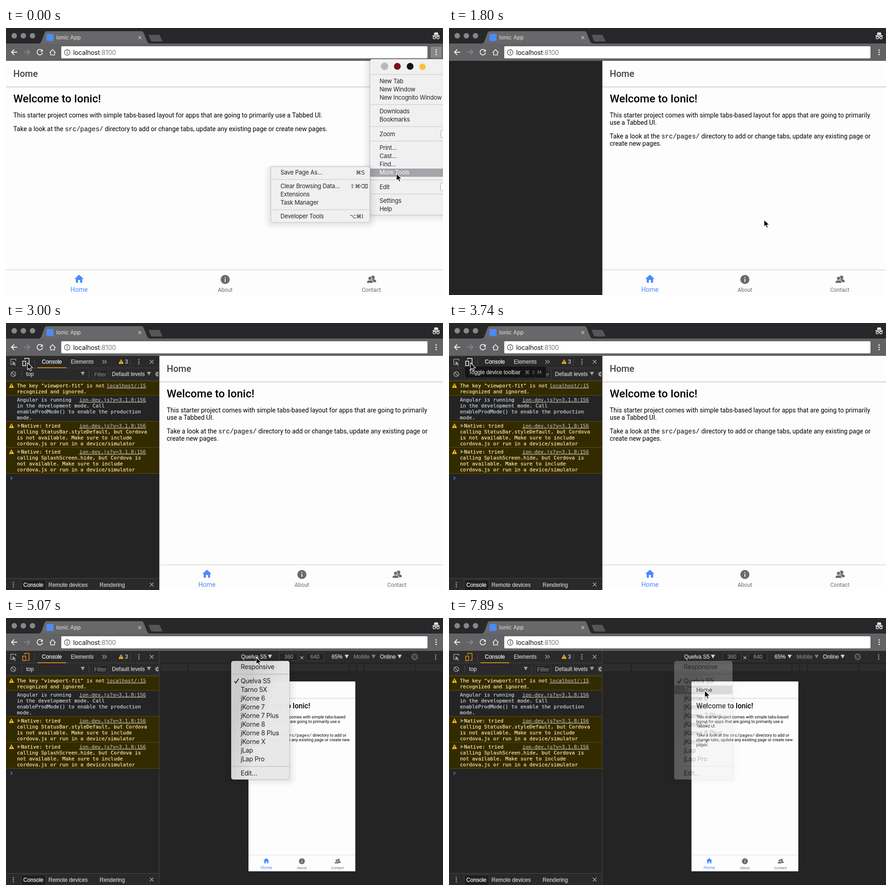
An HTML page for the animation above (8000 ms loop, 957x585 px).

```html
<!DOCTYPE html>
<html lang="en">
<head>
<meta charset="utf-8">
<title>Device preview</title>
<style>
html, body { margin: 0; width: 100%; height: 100%; overflow: hidden; background: #fdfdfd; }
svg { display: block; }
text { white-space: pre; }
.mac { font: 13px Inter, sans-serif; letter-spacing: -.3px; fill: #262626; }
.drop { font: 14px Inter, sans-serif; letter-spacing: -.25px; fill: #1c1c1c; }
.key { font: 12px "DejaVu Sans", sans-serif; fill: #262626; }
.page { font: 14px Roboto, sans-serif; fill: #000; }
.code { font-family: "Liberation Mono", monospace; }
.dev, .log { color: #cdcdcd; fill: currentColor; stroke: currentColor; stroke-width: .25px; }
.dev { font: 12px "Liberation Sans", sans-serif; }
.log { font: 11px "DejaVu Sans Mono", monospace; }
.mid { text-anchor: middle; }
.end { text-anchor: end; }
</style>
</head>
<body>
<svg id="stage" width="957" height="585" viewBox="0 0 957 585"></svg>
<script>
const rect = (x, y, w, h, fill, more = '') =>
  `<rect x="${x}" y="${y}" width="${w}" height="${h}" fill="${fill}" ${more}/>`;
const dot = (x, y, r, fill, more = '') =>
  `<circle cx="${x}" cy="${y}" r="${r}" fill="${fill}" ${more}/>`;
const path = (d, fill, more = '') => `<path d="${d}" fill="${fill}" ${more}/>`;
const line = (d, color, w = 1, more = '') =>
  path(d, 'none', `stroke="${color}" stroke-width="${w}" ${more}`);
const text = (x, y, s, cls, more = '') =>
  `<text x="${x}" y="${y}" class="${cls}" ${more}>${s}</text>`;
const group = (id, body, more = '') => `<g id="${id}" ${more}>${body}</g>`;
const tint = c => `style="color:${c}"`;
const dots = (x, y, gap, r, c) => [-1, 0, 1].map(k => dot(x, y + k * gap, r, c)).join('');
const cross = (x, y, r, c, w) =>
  line(`M${x - r} ${y - r}l${2 * r} ${2 * r}m0 ${-2 * r}l${-2 * r} ${2 * r}`, c, w);
const down = (x, y, c) => path(`M${x - 4.5} ${y - 4}h9l-4.5 8z`, c);
const vline = (x, y, h, c = '#4a4a4a') => rect(x, y, 1, h, c);

// Browser window

function chrome() {
  const ink = '#f1f1f1';
  return rect(0, 0, 957, 34, '#28282a') + rect(0, 34, 957, 38, '#636365') +
    [18, 38, 58].map(x => dot(x, 17, 6, '#878787')).join('') +
    path('M72 34C76 33 77 31 78.500 27L84 12C85.500 8 87 7 90 7H296C299 7 300.500 8 302 12L308 27C310 32 311 33 315 34Z', '#68686a') +
    path('M312 15H334Q336 15 337 17L342 27Q343 29.500 341 29.500H320Q318 29.500 317 27Z', '#565658') +
    rect(88.5, 13, 15.5, 15.5, '#4b8bf5', 'rx="2"') +
    text(110, 25, 'Ionic App', 'mac', 'style="font-size:12px;letter-spacing:0;fill:#e6e6e6"') +
    cross(293, 21, 3.2, '#c4c4c4', 1.3) +
    line('M24.500 53H12.500M18 47L12 53L18 59', ink, 1.8) +
    line('M39.500 53H51.500M46 47L52 53L46 59', '#858587', 1.8) +
    line('M79 49.500A6 6 0 1 0 80 54', ink, 1.8) + path('M80.500 46.500V52H75Z', ink) +
    line('M95.500 54L102 47.500L108.500 54M97.700 53V59H106.300V53', ink, 1.6) +
    rect(121, 40, 802, 26.5, '#fff', 'rx="2"') +
    dot(134, 53.5, 6, 'none', 'stroke="#555" stroke-width="1.3"') +
    rect(133.3, 52.3, 1.5, 4.5, '#555') + rect(133.3, 49.8, 1.5, 1.5, '#555') +
    text(147, 58.5, 'localhost<tspan fill="#777">:8100</tspan>', 'mac',
      'style="font-size:14px;letter-spacing:-.15px;fill:#111"') +
    path('M937 15L938.500 10Q939 9.200 940 9.500L942 10L944 9.500Q945 9.200 945.500 10L947 15Z', ink) +
    rect(934, 16, 16, 1.6, ink) +
    [938, 946].map(x => dot(x, 21, 2.7, 'none', `stroke="${ink}" stroke-width="1.4"`)).join('') +
    line('M940.500 20.500Q942 19.500 943.500 20.500', ink, 1.2) +
    group('menuButton', rect(930, 41, 24, 25, '#88888a', 'rx="2"')) +
    dots(942, 53, 5, 1.6, ink);
}

// Web page, laid out for a given viewport

function page(id, w, h, para1, para2, place) {
  const lines = (y, rows) => rows.map((s, k) => text(16, y + 16 * k, s, 'page')).join('');
  const top = h - 56, gray = '#6b6b6b';
  const c = [1, 3, 5].map(k => w * k / 6);
  const label = (k, s, size, color) =>
    text(c[k], top + 49, s, 'page mid', `style="font-size:${size}px;fill:${color}"`);
  const person = (x, y, more) =>
    dot(x, y - 3.5, 4, gray, more) + path(`M${x - 7} ${y + 7}v-2.500q0-4 7-4t7 4v2.500z`, gray, more);
  return group(id,
    rect(0, 0, w, h, '#fdfdfd') +
    rect(0, 56, w, 1.6, '#cdcdcd') + rect(0, 57.6, w, 1.4, '#ececec') +
    text(16, 35, 'Home', 'page', 'style="font-size:20px;font-weight:500;fill:#424242"') +
    text(16, 91, 'Welcome to Ionic!', 'page', 'style="font-size:24px;font-weight:500"') +
    lines(124, para1) + lines(124 + 16 * para1.length + 14, para2) +
    rect(0, top, w, 1.6, '#dcdcdc') +
    path(`M${c[0]} ${top + 11.500}l-10 9.200h3v8.300h4.800v-6h4.400v6h4.800v-8.300h3z`, '#488aff') +
    label(0, 'Home', 14, '#488aff') +
    dot(c[1], top + 22, 10, gray) + rect(c[1] - 1, top + 21, 2, 6, '#fdfdfd') +
    rect(c[1] - 1, top + 17, 2, 2, '#fdfdfd') + label(1, 'About', 12, gray) +
    person(c[2] + 3.5, top + 21, '') +
    person(c[2] - 3, top + 23, 'stroke="#fdfdfd" stroke-width="1.2"') +
    label(2, 'Contact', 12, gray), `transform="${place}"`);
}
const src = '<tspan class="code">src/pages/</tspan>';
const intro = 'This starter project comes with simple tabs-based';

// Menus

function panel(x, y, w, h, color) {
  const halo = [14, 9, 5, 2].map(k =>
    rect(x - k, y - k / 3, w + 2 * k, h + k * 4 / 3, '#000', `rx="${k + 3}" opacity=".022"`)).join('');
  return halo + rect(x, y, w, h, color, 'rx="5" stroke="#000" stroke-opacity=".18"');
}
const rule = (x, y, w, c = '#d3d3d3') => rect(x, y, w, 1.5, c);

const subRows = [['Save Page As…', 308, '⌘S', 766], ['Clear Browsing Data…', 338, '⇧⌘⌫', 754],
  ['Extensions', 356], ['Task Manager', 374], ['Developer Tools', 404, '⌥⌘I', 753]];

function mainMenu() {
  const rows = [['New Tab', 121], ['New Window', 139], ['New Incognito Window', 157],
    ['Downloads', 187], ['Bookmarks', 205], ['Zoom', 237], ['Print…', 267], ['Cast…', 285],
    ['Find…', 303], ['Edit', 353], ['Settings', 383], ['Help', 401]];
  const box = 'rx="2" stroke="#a5a5a5"';
  return panel(797, 68, 180, 342, '#f0f0f0') +
    dot(829, 84, 8, '#b9b9b9') + dot(857, 84, 7.5, '#800f17') +
    dot(885, 84, 7.5, '#111') + dot(912, 85, 7, '#f6c22f') +
    [101, 167, 215, 247, 332, 363].map(y => rule(797.5, y, 160)).join('') +
    rect(952.5, 223.5, 20, 17, '#fbfbfb', box) + rect(951.5, 339.5, 20, 17, '#fbfbfb', box) +
    rows.map(([s, y]) => text(818, y, s, 'mac')).join('') +
    rect(797.5, 308, 160, 18, '#a5a4a9') + text(818, 321, 'More Tools', 'mac', 'style="fill:#fff"') +
    panel(580, 304, 217, 122, '#f0f0f0') + rule(580.5, 331, 216) + rule(580.5, 397.5, 216) +
    group('subMark', rect(580.5, 0, 216, 18, '#a5a4a9')) +
    subRows.map(([s, y, key, x], k) => group('sub' + k, text(601, y + 13, s, 'mac') +
      (key ? text(x, y + 13, key, 'key') : ''))).join('');
}

const devices = ['Quelva S5', 'Tarno 5X', 'jKorne 6', 'jKorne 7', 'jKorne 7 Plus', 'jKorne 8',
  'jKorne 8 Plus', 'jKorne X', 'jLap', 'jLap Pro'];
const dropRows = [['Responsive', 98], ...devices.map((s, k) => [s, 129 + 19 * k]), ['Edit…', 331]];

// The blurred page behind shows through as a slanted light area.
const glass = `<linearGradient id="glass" gradientUnits="userSpaceOnUse" x1="500" y1="220" x2="565" y2="240">
  <stop stop-color="#d0d0d0"/><stop offset="1" stop-color="#e8e8e8"/></linearGradient>`;

function dropMenu() {
  return glass + panel(493, 94, 128, 260, 'url(#glass)') +
    rule(493.5, 122.5, 127, '#bdbdbd') + rule(493.5, 324.5, 127, '#c4c4c4') +
    group('dropMark', rect(493.5, 0, 127, 19, '#87868c')) +
    line('M500 138.500L503.300 142.500L509.500 133', '#1c1c1c', 1.9) +
    dropRows.map(([s, y], k) => text(514, y + 14, s, 'drop', `id="drop${k}"`)).join('');
}

// Developer tools

const warnIcon = (x, y) =>
  path(`M${x} ${y - 4.5}l4.800 9h-9.600z`, '#f7c024', 'stroke="#f7c024" stroke-linejoin="round"') +
  rect(x - .7, y - 2, 1.4, 3.6, '#3a3000') + rect(x - .7, y + 2.5, 1.4, 1.4, '#3a3000');
const prompt = y => line(`M10 ${y - 3}l3.500 3l-3.500 3`, '#4a86f0', 1.6);

function message(y, rows, link, warn) {
  const ink = warn ? '#ffe3a4' : '#c8d0d8', h = rows.length * 13 + 5;
  const native = rows[0].startsWith('Native');
  return (warn ? rect(0, y, 335, h, '#332b00') + rect(0, y, 335, 1, '#5f5000') +
      rect(0, y + h, 335, 1, '#5f5000') + warnIcon(12, y + 10) : '') +
    (native ? path(`M25.500 ${y + 6}v8l6.500-4z`, '#8f8f88') : '') +
    rows.map((s, k) => text(native && !k ? 33 : 24, y + 14 + 13 * k, s, 'log', tint(ink))).join('') +
    text(306.5, y + 14, link, 'log end', tint('#b3b0a2') + ' text-decoration="underline"');
}

function messages() {
  const js = 'ion-dev.js?v=3.1.8:156';
  const tail = 'cordova.js or run in a device/simulator';
  return message(127, ['The key "viewport-fit" is not', 'recognized and ignored.'], 'localhost/:15', true) +
    message(158, ['Angular is running', 'in the development mode. Call',
      'enableProdMode() to enable the production', 'mode.'], js, false) +
    message(215, ['Native: tried', 'calling StatusBar.styleDefault, but Cordova',
      'is not available. Make sure to include', tail], js, true) +
    message(272, ['Native: tried', 'calling SplashScreen.hide, but Cordova is',
      'not available. Make sure to include', tail], js, true) +
    prompt(340) + warnIcon(252, 84.5) + text(260.5, 89, '3', 'dev');
}

function tools() {
  const gray = '#a0a0a0', bar = '#2a2a2a', edge = '#414141';
  const teeth = [0, 45, 90, 135].map(a =>
    rect(326.5, 110.9, 11, 2.2, gray, `transform="rotate(${a} 332 112)"`)).join('');
  return rect(0, 72, 335, 27, bar) + rect(0, 99, 335, 26, bar) +
    rect(0, 98, 335, 1, edge) + rect(0, 125, 335, 1, edge) +
    line('M14 90.500H10.500V79.500H21.500V83', gray, 1.4) + path('M14.500 83.500V93L17 90.700L20 94L21.500 92.700L18.600 89.500L21.800 89Z', gray) +
    vline(62, 78, 16) + vline(272, 78, 16) +
    text(78.5, 89, 'Console', 'dev', tint('#f5f5f5')) + rect(69, 97, 63, 2, '#d48a1c') +
    text(142, 89, 'Elements', 'dev') +
    line('M211 81l4 4l-4 4M216 81l4 4l-4 4', gray, 1.5) +
    dots(291, 85, 4.5, 1.4, gray) + cross(319, 85, 4, gray, 1.6) +
    dot(16, 112, 5.3, 'none', `stroke="${gray}" stroke-width="1.6"`) + line('M12.300 108.300l7.400 7.400', gray, 1.6) +
    vline(34, 104, 16) + text(44, 116, 'top', 'dev') + down(168, 111, gray) + vline(181, 104, 16) +
    rect(189.5, 103.5, 34, 18, '#242424', `stroke="${edge}"`) + text(193, 117, 'Filter', 'dev', tint('#808080')) +
    text(232, 116, 'Default levels', 'dev') + down(313, 111, gray) +
    `<svg width="334" height="585">${teeth}${dot(332, 112, 3.8, gray)}${dot(332, 112, 1.6, bar)}</svg>` +
    rect(0, 559, 335, 26, bar) + rect(0, 559, 335, 1, '#4a4a4a') +
    dots(16, 573.5, 4.5, 1.4, gray) +
    rect(33.5, 562.5, 54, 24, '#1f1f1f', `stroke="${edge}"`) +
    text(38, 578, 'Console', 'dev', tint('#f5f5f5')) + text(93, 578, 'Remote devices', 'dev') +
    text(205, 578, 'Rendering', 'dev') + cross(319, 573, 4, gray, 1.6) +
    group('phone', path('M41 80V77.500H50.500V92.500H46', 'none') +
      path('M36.500 83.500H43V93.500H36.500Z', 'none'), 'stroke-width="1.5"') +
    group('emptyLog', prompt(138)) + group('fullLog', messages());
}

function deviceMode() {
  const dim = '#808080', ink = '#d8d8d8';
  const field = (x, s) => rect(x + .5, 76.5, 40, 17, '#242424', 'stroke="#454545"') +
    text(x + 20.5, 89, s, 'dev mid', tint('#8a8a8a'));
  return rect(336, 72, 621, 513, '#242424') + rect(336, 72, 621, 26, '#2a2a2a') +
    text(515, 89, devices[0], 'dev', tint(ink)) + down(578, 84.5, ink) +
    field(599, '360') + cross(648, 87, 3, '#b0b0b0', 1.4) + field(656, '640') +
    text(713, 89, '65%', 'dev', tint(ink)) + down(746, 84.5, ink) +
    text(761, 89, 'Mobile', 'dev', tint(dim)) + down(805, 84.5, dim) +
    text(819, 89, 'Online', 'dev', tint(ink)) + down(862, 84.5, ink) +
    dot(895, 85, 6, 'none', `stroke="${dim}" stroke-width="1.3"`) +
    rect(892.5, 79, 5, 12, '#2a2a2a', `stroke="${dim}" stroke-width="1.2" transform="rotate(-45 895 85)"`) +
    dots(941, 85.5, 4.5, 1.4, '#a0a0a0') +
    rect(338, 101, 619, 15.5, '#2d2d2d') +
    [399, 511, 527, 545, 751, 768, 785, 897].map(x => rect(x - 1, 101, 1.6, 15.5, '#1e1e1e')).join('');
}

const stage = document.getElementById('stage');
stage.innerHTML =
  page('wide', 960, 513, [intro + ' layout for apps that are going to primarily use a Tabbed UI.'],
    [`Take a look at the ${src} directory to add or change tabs, update any existing page or create new pages.`],
    'translate(0 72)') +
  page('side', 624, 513, [intro + ' layout for apps that are going to primarily', 'use a Tabbed UI.'],
    [`Take a look at the ${src} directory to add or change tabs, update any existing page or`, 'create new pages.'],
    'translate(336 72)') +
  group('device', deviceMode() +
    page('small', 360, 640, [intro, 'layout for apps that are going to primarily use a', 'Tabbed UI.'],
      [`Take a look at the ${src} directory to add or`, 'change tabs, update any existing page or create new', 'pages.'],
      'translate(531 139) scale(.65)')) +
  group('dock', rect(0, 72, 336, 513, '#242424') + rect(335, 72, 1, 513, '#454545')) +
  group('tools', tools()) +
  chrome() +
  group('menu', mainMenu()) + group('drop', dropMenu()) +
  group('tip', rect(35, 96, 177, 23, '#151515', 'rx="2" stroke="#000" stroke-opacity=".4"') +
    text(43, 112, 'Toggle device toolbar', 'dev') +
    text(166, 112, '⌘ ⇧ M', 'key', 'style="font-size:11px;fill:#8f8f8f"')) +
  group('cursor', path('M0 0V15.600L3.600 12.200L6 17.700L8.600 16.600L6.300 11.200H11.200Z', '#000',
    'stroke="#fff" stroke-width="1.1" stroke-linejoin="round"'));

const el = {};
stage.querySelectorAll('[id]').forEach(n => el[n.id] = n);
const show = (id, on) => { el[id].style.display = on ? '' : 'none'; };
const fade = (id, o) => { show(id, o > 0); el[id].style.opacity = o; };

// start, end, steps, from, to
const moves = [
  [150, 750, 5, [855, 319], [690, 420]],
  [2250, 3000, 6, [690, 420], [47, 87]],
  [4330, 4920, 5, [47, 87], [548, 86]],
  [5360, 5950, 5, [548, 86], [560, 159]]
];

function pointer(t) {
  let at = moves[0][3];
  for (const [start, end, n, a, b] of moves) {
    if (t < start) break;
    const k = Math.min(n, Math.floor((t - start) / (end - start) * (n - 1) + 1e-6) + 1) / n;
    const e = k * k * (3 - 2 * k);
    at = a.map((v, i) => v + (b[i] - v) * e);
  }
  return at;
}

function mark(name, rows, hit) {
  show(name + 'Mark', hit >= 0);
  rows.forEach((row, k) => {
    const node = el[name + k];
    const texts = node.tagName === 'text' ? [node] : node.querySelectorAll('text');
    texts.forEach(n => { n.style.fill = k === hit ? '#fff' : ''; });
  });
  if (hit >= 0) el[name + 'Mark'].firstChild.setAttribute('y', rows[hit][1]);
}
const under = (rows, y, h) => rows.findIndex(r => y >= r[1] && y < r[1] + h);

function draw(t) {
  const [x, y] = pointer(t);
  el.cursor.setAttribute('transform', `translate(${x} ${y})`);

  fade('menu', t < 1500 ? 1 : t < 1650 ? .4 : 0);
  show('menuButton', t < 1650);
  const blink = t >= 1200 && t < 1350;
  mark('sub', subRows, x < 797 && !blink ? under(subRows, y, 18) : -1);

  show('wide', t < 1800);
  show('side', t >= 1800 && t < 4190);
  show('dock', t >= 1800);
  show('tools', t >= 1950);
  show('emptyLog', t < 2100);
  show('fullLog', t >= 2100);
  fade('tip', t < 3600 || t >= 4190 ? 0 : t < 3740 ? .5 : 1);
  el.phone.setAttribute('stroke', t >= 4190 ? '#e8921a' : t >= 3000 ? '#f4f4f4' : '#a0a0a0');

  show('device', t >= 4190);
  fade('drop', t < 5070 ? 0 : t < 7890 ? .98 : .3);
  mark('drop', dropRows, t >= 5070 ? under(dropRows, y, 19) : -1);
}

const begin = performance.now();
function tick() {
  draw((performance.now() - begin) % 8000);
  requestAnimationFrame(tick);
}
tick();
</script>
</body>
</html>
```
